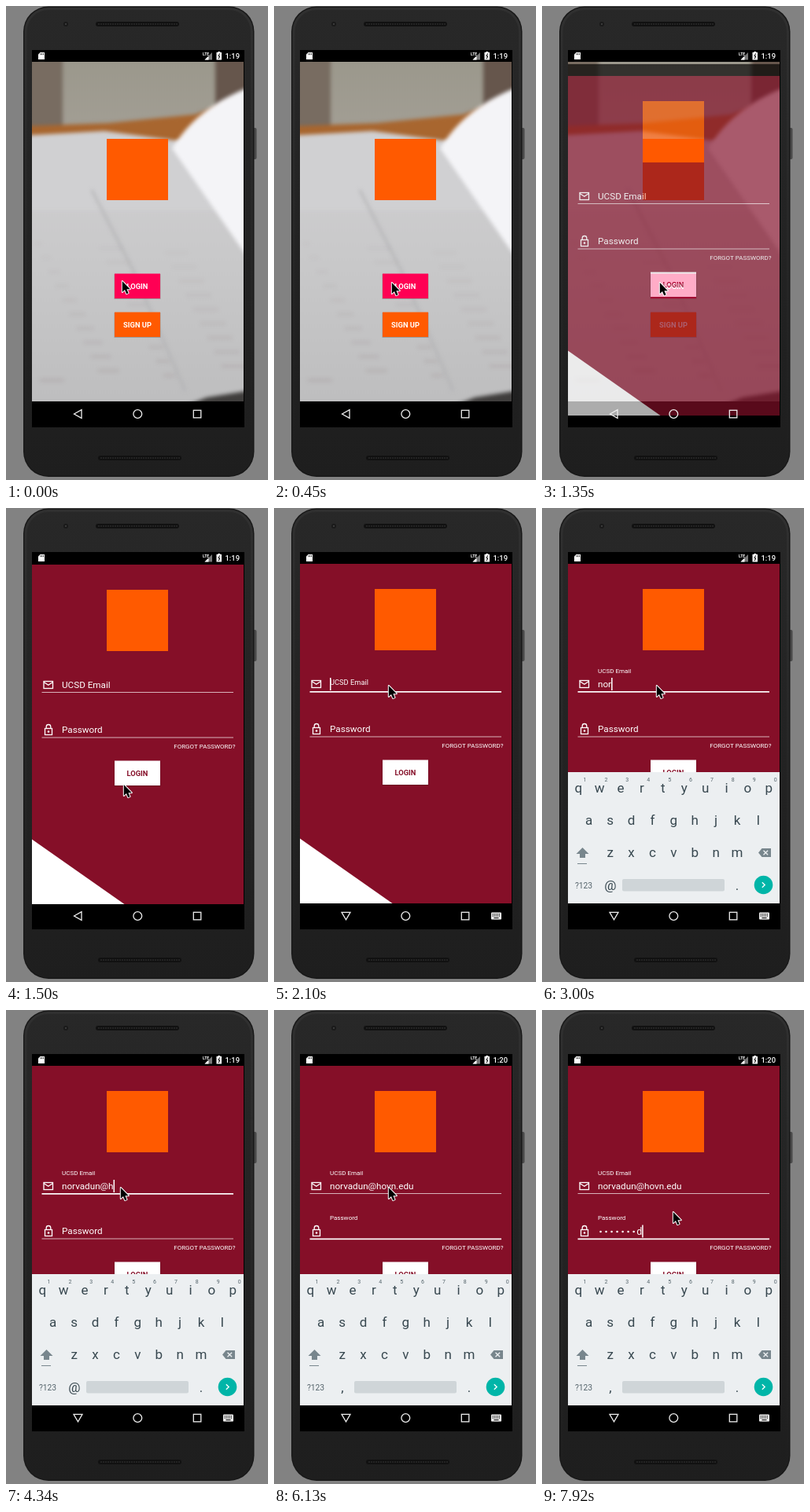
Animation of 333 by 603 pixels, one loop 8 s. Source, as an HTML page with a canvas:

```html
<!DOCTYPE html>
<html lang="en">
<head>
<meta charset="utf-8">
<title>Login screen</title>
<style>
html, body { margin: 0; width: 100%; height: 100%; overflow: hidden; background: #828282; }
canvas { display: block; }
</style>
</head>
<body>
<canvas id="stage" width="333" height="603"></canvas>
<script>
const W = 333, H = 603, LOOP = 8000, TICK = 150, KEY_PACE = 146;
const SANS = 'Roboto, sans-serif', MONO = '"Noto Sans Mono", monospace';
const WINE = '#850f28', WHITE = '#fff', ORANGE = '#ff5a00';
const OPEN = 1301, FOCUS_EMAIL = 2100, KEYBOARD = 2250, FOCUS_SECRET = 5830;

// bursts of typing: start time and the characters that follow at an even pace
const EMAIL = [[2400, 'n'], [2700, 'o'], [3000, 'rvadun'], [4190, '@h'], [4640, 'ov'], [5090, 'n.edu']];
const SECRET = [[6280, 'mis'], [6880, 'tr'], [7330, 'oad']];

const stage = document.getElementById('stage').getContext('2d');
let c = stage;

const clamp = v => Math.min(1, Math.max(0, v));
const smooth = v => v * v * (3 - 2 * v);
const held = t => Math.floor((t + 20) / TICK) * TICK;

function typed(bursts, t) {
  return bursts.map(([at, chars]) =>
    chars.slice(0, Math.max(0, Math.floor((t - at) / KEY_PACE) + 1))).join('');
}

function surface() {
  const canvas = document.createElement('canvas');
  canvas.width = W;
  canvas.height = H;
  return canvas.getContext('2d');
}

function paintOn(target, paint) {
  const previous = c;
  c = target;
  paint();
  c = previous;
}

function rect(x, y, w, h, fill) {
  c.fillStyle = fill;
  c.fillRect(x, y, w, h);
}

function frame(x, y, w, h, color, width = 1.3) {
  c.strokeStyle = color;
  c.lineWidth = width;
  c.strokeRect(x, y, w, h);
}

function trace(points, close = true) {
  c.beginPath();
  points.forEach(([x, y]) => c.lineTo(x, y));
  if (close) c.closePath();
}

function poly(points, fill) {
  trace(points);
  c.fillStyle = fill;
  c.fill();
}

function line(points, color, width = 1.3, close = false) {
  trace(points, close);
  c.strokeStyle = color;
  c.lineWidth = width;
  c.stroke();
}

function rounded(x, y, w, h, r, fill) {
  c.beginPath();
  c.roundRect(x, y, w, h, r);
  c.fillStyle = fill;
  c.fill();
}

function disc(x, y, r, fill) {
  c.beginPath();
  c.arc(x, y, r, 0, 7);
  c.fillStyle = fill;
  c.fill();
}

function text(str, x, y, size, color, { align = 'left', weight = 400, family = SANS } = {}) {
  c.font = `${weight} ${size}px ${family}`;
  c.textAlign = align;
  c.fillStyle = color;
  c.fillText(str, x, y);
}

function vertical(y0, y1, ...colors) {
  const g = c.createLinearGradient(0, y0, 0, y1);
  colors.forEach((color, i) => g.addColorStop(i / (colors.length - 1), color));
  return g;
}

function button(label, y, fill, color) {
  rect(137.5, y + .5, 59, 32, 'rgba(0,0,0,.2)');
  rect(138, y, 58, 31.5, fill);
  text(label, 167, y + 19.5, 9.3, color, { align: 'center', weight: 700 });
}

function paintPhone() {
  rect(0, 0, W, H, '#828282');
  rounded(312, 155, 6.5, 40, 2, '#4a4a4a');
  for (const [inset, shade] of [[0, '#181818'], [1.5, '#303030'], [4.5, '#282828']]) {
    rounded(22 + inset, .5 + inset, 293.5 - 2 * inset, 598.5 - 2 * inset, 32 - inset,
      vertical(0, H, shade, inset ? '#1e1e1e' : shade));
  }
  for (const [x, y] of [[114, 20], [117, 572]]) {
    rounded(x, y, 106, 6, 3, '#111');
    for (let i = 0; i < 34; i++) disc(x + 4 + i * 3, y + 3, .8, '#3b3b3b');
  }
  disc(76, 23, 3, '#191919');
  disc(76, 23, 1.2, '#3b3b3b');
  rect(33, 56, 270, 480, '#000');
}

function paintPhoto() {
  c.filter = 'blur(2.5px)';
  rect(0, 40, W, 500, vertical(165, 500, '#d1d0d2', '#c8c8c9', '#bebebf'));
  rect(0, 40, W, 130, vertical(71, 155, '#9b988c', '#a29e94'));
  rect(0, 40, 72, 130, '#786c61');
  rect(266, 40, 70, 90, '#66564c');
  poly([[20, 153], [130, 149], [240, 138], [330, 105], [330, 190], [20, 175]], '#a8662f');
  poly([[20, 165], [125, 159], [215, 171], [330, 180], [330, 260], [20, 260]], '#d0d0d2');
  c.beginPath();
  c.moveTo(211, 181);
  c.bezierCurveTo(225, 160, 252, 120, 330, 96);
  c.lineTo(330, 353);
  c.fillStyle = '#f4f4f7';
  c.fill();
  line([[109, 234], [161, 335], [228, 490]], '#b2b2b4', 2.5);
  poly([[225, 510], [255, 498], [330, 486], [330, 520]], '#3f3d3c');
  // faint blurred writing, stronger towards the bottom
  for (let i = 0; i < 30; i++) {
    const k = Math.abs(Math.sin(i * 7.3)), y = 300 + i * 6;
    rect(36 + (i * 83) % 240, y, 10 + k * 22, 4, `rgba(125,100,105,${.03 + i * .004})`);
  }
  c.filter = 'none';
}

function paintWelcome() {
  c.drawImage(photo.canvas, 33, 71, 269, 432, 33, 71, 269, 432);
  rect(128, 169, 78, 78, ORANGE);
  button('LOGIN', 340.5, '#ff0054', WHITE);
  button('SIGN UP', 389.5, ORANGE, WHITE);
}

function mailIcon() {
  frame(48, 219.5, 11.5, 9, WHITE);
  line([[48, 220.5], [53.8, 224.3], [59.5, 220.5]], WHITE);
}

function lockIcon() {
  frame(49.5, 279.5, 9, 8, WHITE);
  c.beginPath();
  c.arc(54, 277.3, 2.8, Math.PI, 0);
  c.lineTo(56.8, 279.5);
  c.moveTo(51.2, 277.3);
  c.lineTo(51.2, 279.5);
  c.stroke();
  disc(54, 283.5, 1.3, WHITE);
}

// the hint shrinks first and leaps up at the end
function floatingHint(label, baseline, progress) {
  text(label, 71, baseline - 18 * progress ** 4, 11.7 - 3.7 * progress, WHITE);
}

function underline(y, focused) {
  rect(45.5, y, 243.5, focused ? 1.7 : 1, focused ? WHITE : 'rgba(255,255,255,.68)');
}

function caret(x, y) {
  rect(x, y, 1.5, 16, WHITE);
}

function paintLogin(t) {
  const onEmail = t >= FOCUS_EMAIL && t < FOCUS_SECRET, onSecret = t >= FOCUS_SECRET;
  rect(33, 56, 269, 480, '#000');
  rect(33, 71, 269, 432, WINE);
  poly([[33, 420.5], [150.5, 503], [33, 503]], WHITE);
  rect(128, 103, 78, 78, ORANGE);

  mailIcon();
  floatingHint('UCSD Email', 228, t < FOCUS_EMAIL ? 0 : clamp((held(t) - FOCUS_EMAIL + 130) / 200));
  const address = typed(EMAIL, t);
  text(address, 71, 228, 11.7, WHITE);
  if (onEmail) caret(71 + c.measureText(address).width, 216);
  underline(233, onEmail);

  lockIcon();
  floatingHint('Password', 285, onSecret ? 1 : 0);
  const secret = typed(SECRET, t), last = secret.length - 1, pitch = 7.02;
  for (let i = 0; i < last; i++) disc(71 + pitch * (i + .5), 282, 1.3, WHITE);
  text(secret.slice(-1), 71 + pitch * last, 286, 11.7, WHITE, { family: MONO });
  if (onSecret && (secret || t < FOCUS_SECRET + 300)) caret(71 + pitch * secret.length, 273.5);
  underline(290.5, onSecret);

  text('FORGOT PASSWORD?', 291.5, 305, 8, WHITE, { align: 'right' });
  button('LOGIN', 320.5, WHITE, WINE);
}

function paintKeyboard(t) {
  const ink = '#37474f', soft = '#78868d', paper = '#eceff1', step = 26.9;
  const key = (str, x, y, size = 17, color = ink) => text(str, x, y, size, color, { align: 'center' });
  rect(33, 336, 269, 167, paper);
  ['qwertyuiop', 'asdfghjkl', 'zxcvbnm'].forEach((row, r) =>
    [...row].forEach((ch, i) => key(ch, 167.3 + (i - (row.length - 1) / 2) * step, 362 + r * 41)));
  for (let i = 0; i < 10; i++) key((i + 1) % 10, 54.5 + i * step, 347.5, 7, '#56656c');

  poly([[51.5, 432], [59.5, 440], [43.5, 440]], soft);
  rect(48, 440, 7, 5, soft);
  rect(45, 452, 12, 1, soft);
  poly([[275, 438.5], [279.5, 433], [291, 433], [291, 444], [279.5, 444]], soft);
  for (const d of [-2.8, 2.8]) line([[284.3 - 2.8, 438.5 - d], [284.3 + 2.8, 438.5 + d]], paper);

  key('?123', 53, 483.5, 10.3, '#56656c');
  key(t < FOCUS_SECRET ? '@' : ',', 87, 485.5);
  rounded(102, 472, 130, 15.5, 2, '#cfd5d8');
  key('.', 248, 485.5);
  disc(281.5, 479.5, 11.8, '#00b5a8');
  line([[279.8, 476.2], [283.2, 479.5], [279.8, 482.8]], WHITE);
}

function paintStatus(t) {
  poly([[43.5, 59], [49, 59], [49, 68], [41, 68], [41, 61.5]], WHITE);
  for (let i = 0; i < 3; i++) rect(43.5 + i * 1.8, 60.2, .8, 2, '#000');
  text('LTE', 250, 63, 5, WHITE, { weight: 700 });
  poly([[262, 59], [262, 68.5], [252.5, 68.5]], '#777');
  poly([[257.5, 63.5], [257.5, 68.5], [252.5, 68.5]], WHITE);
  rect(267.5, 59, 6.5, 9.5, WHITE);
  rect(269.3, 58, 3, 1, WHITE);
  line([[271.6, 60.5], [269.9, 63.9], [271.8, 63.9], [270.2, 67.2]], '#000', 1);
  text(t < 4640 ? '1:19' : '1:20', 297, 67, 9.4, WHITE, { align: 'right', weight: 500 });
}

function paintNav(t) {
  const color = '#eee';
  if (t < FOCUS_EMAIL) {
    line([[86.5, 519], [96, 513.7], [96, 524.3]], color, 1.3, true);
  } else {
    line([[86, 514.3], [97, 514.3], [91.5, 523.8]], color, 1.3, true);
    rounded(276, 514.5, 13, 9, 1, color);
    for (let i = 0; i < 10; i++) rect(277.5 + i % 5 * 2.1, 516.2 + (i > 4) * 2.2, 1.2, 1.2, '#000');
    rect(279.5, 521, 6, 1, '#000');
  }
  frame(238.3, 514.3, 9.5, 9.5, color);
  c.beginPath();
  c.arc(167.3, 519, 5.4, 0, 7);
  c.stroke();
}

function paintPointer(t) {
  const at = held(t);
  const glide = (start, duration) => smooth(clamp((at - start) / duration));
  const nudge = glide(0, 450), toEmail = glide(1500, 450), toSecret = glide(7650, 300);
  c.save();
  c.translate(147 + 2 * nudge - 4 * toEmail + 42 * toSecret,
    349 + 2 * nudge - 126 * toEmail + 62 * toSecret);
  trace([[.8, 1], [.8, 15], [4, 12], [6.2, 17.2], [8.6, 16.2], [6.4, 11.2], [10.8, 11.2]]);
  c.lineJoin = 'round';
  c.strokeStyle = WHITE;
  c.lineWidth = 2;
  c.stroke();
  c.fillStyle = '#000';
  c.fill();
  c.restore();
}

const phone = surface(), photo = surface(), login = surface();
paintOn(phone, paintPhone);
paintOn(photo, paintPhoto);

// the login screen rises and fades in over the welcome screen
function paintTransition(t) {
  const age = held(t) - OPEN;
  const shift = Math.round(38 * (1 - clamp(age / 350)) ** 5);
  paintOn(login, () => paintLogin(t));
  c.save();
  c.beginPath();
  c.rect(33, 71, 269, 465);
  c.clip();
  c.globalAlpha = 1 - (1 - clamp(age / 200)) ** 4;
  c.drawImage(login.canvas, 33, 56, 269, 480, 33, 56 + shift, 269, 480);
  c.restore();
}

function paint(t) {
  c.drawImage(phone.canvas, 0, 0);
  if (t < 1500) paintWelcome();
  if (t >= 1350) paintTransition(t);
  if (t >= KEYBOARD) {
    c.globalAlpha = t < KEYBOARD + TICK ? .8 : 1;
    paintKeyboard(t);
    c.globalAlpha = 1;
  }
  paintStatus(t);
  paintNav(t);
  paintPointer(t);
}

const start = performance.now();
function tick() {
  paint((performance.now() - start) % LOOP);
  requestAnimationFrame(tick);
}
tick();
</script>
</body>
</html>
```
